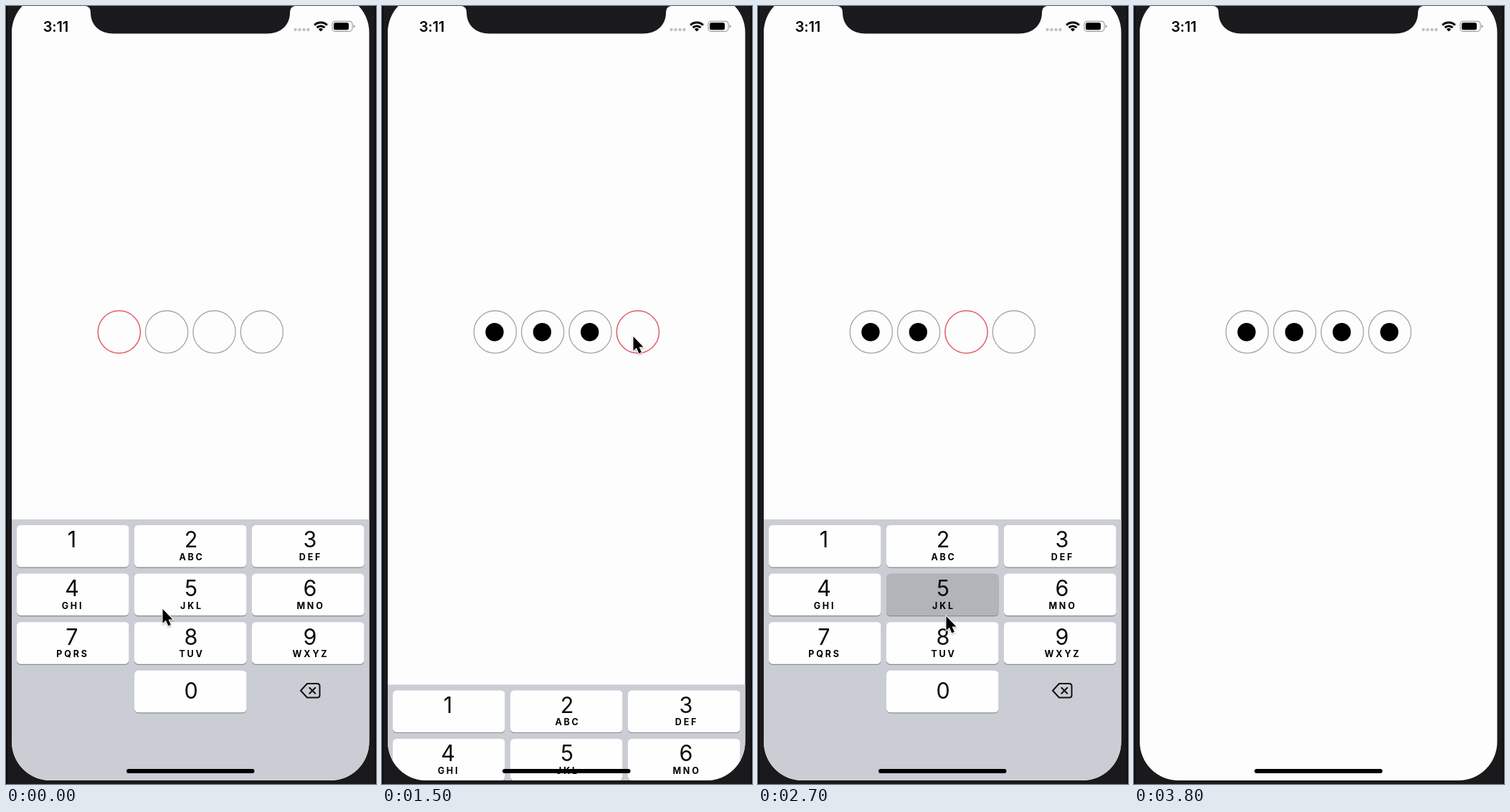
Recreate the animation shown at these times as an HTML page. Size 516 by 1085 pixels, loop 4100 ms.

```html
<!DOCTYPE html>
<html lang="en">
<head>
<meta charset="utf-8">
<title>Passcode entry</title>
<style>
  html, body { margin: 0; width: 100%; height: 100%; overflow: hidden; background: #1a191b; }
  svg { display: block; width: 516px; height: 1085px; font-family: Inter, "Noto Sans", sans-serif; }
  .digit { font-size: 30.5px; text-anchor: middle; fill: #0b0b0c; }
  .letters { font-size: 12.5px; font-weight: 700; letter-spacing: 2.8px; text-anchor: middle; }
  .field { fill: none; stroke: #a4a4a8; stroke-width: 1.3; }
  .field.active { stroke: #e05c6b; stroke-width: 1.5; }
  .key { fill: #fefefe; }
  .key.pressed { fill: #b2b4b9; }
</style>
</head>
<body>
<svg viewBox="0 0 516 1085">
  <defs>
    <clipPath id="screen"><rect x="8" y="-17" width="498.5" height="1097" rx="54"/></clipPath>
    <filter id="shadow" x="-50%" y="-50%" width="200%" height="200%">
      <feDropShadow dx="0" dy="1.5" stdDeviation="1.3" flood-opacity=".35"/>
    </filter>
  </defs>
  <rect width="516" height="1085" fill="#1a191b"/>
  <path d="M1 0V1085M515 0V1085" stroke="#0d0c0d" stroke-width="2"/>
  <g clip-path="url(#screen)">
    <rect width="516" height="1085" fill="#fefdfe"/>
    <g id="fields"></g>
    <g id="keyboard">
      <rect x="8" y="716" width="499" height="370" fill="#cacdd4"/>
      <g id="keys"></g>
      <g fill="none" stroke="#111" stroke-width="2" stroke-linejoin="round" stroke-linecap="round">
        <path d="M420 945H434Q437.5 945 437.5 948.5V961Q437.5 964.5 434 964.5H420L411 954.700Z"/>
        <path d="M423.3 950.7L431.3 958.7M431.3 950.7L423.3 958.7"/>
      </g>
    </g>
    <rect x="168" y="1064" width="178.5" height="6" rx="3"/>
  </g>
  <path d="M111 0Q118 1 118 9C118 27 131 38.5 150 38.5H364C383 38.5 396 27 396 9Q396 1 403 0Z" fill="#1a191b"/>
  <text x="51.7" y="36" font-size="20" font-weight="600" letter-spacing="-.2">3:11</text>
  <path d="M403.5 33H422" stroke="#c3c3c6" stroke-width="4.5" stroke-linecap="round" stroke-dasharray="0 6"/>
  <g fill="none" stroke="#000" stroke-width="3">
    <path d="M430.2 26.7A12.5 12.5 0 0 1 447.8 26.7M433.6 30.1A7.7 7.7 0 0 1 444.4 30.1"/>
    <path d="M439 35.5L435.9 32.4A4.4 4.4 0 0 1 442.1 32.4Z" fill="#000" stroke="none"/>
  </g>
  <rect x="455" y="21.3" width="28" height="14" rx="4" fill="none" stroke="#9c9c9f" stroke-width="1.2"/>
  <rect x="457" y="23.3" width="21" height="10" rx="2.3"/>
  <path d="M484.6 25.8Q486.5 26.5 486.5 28.3T484.6 30.8Z" fill="#9c9c9f"/>
  <g id="cursor">
    <path transform="translate(.5 1) scale(.9)" d="M0 0V22L5 17.6L8.7 26L12.6 24.3L9 16H15.5Z" stroke="#fff" stroke-width="2" paint-order="stroke" filter="url(#shadow)"/>
  </g>
</svg>
<script>
const LOOP = 4100, STEP = 100, LAST = 3800, KEYBOARD_HEIGHT = 366;
const PRESS_TIME = 150, FILL_DELAY = 60, FOCUS_DELAY = 130, TRAVEL = 270;
const $ = id => document.getElementById(id);

function add(parent, tag, attributes, text = "") {
  const node = document.createElementNS("http://www.w3.org/2000/svg", tag);
  for (const name in attributes) node.setAttribute(name, attributes[name]);
  node.textContent = text;
  parent.append(node);
  return node;
}

const fields = [0, 1, 2, 3].map(i => {
  const x = 157.8 + i * 66.35;
  return {
    ring: add($("fields"), "circle", { cx: x, cy: 454.6, r: 29.6, class: "field" }),
    dot: add($("fields"), "circle", { cx: x - 0.8, cy: 454.8, r: 12.7 })
  };
});

const keys = {};
const letters = ["", "ABC", "DEF", "GHI", "JKL", "MNO", "PQRS", "TUV", "WXYZ"];
function addKey(digit, column, row) {
  const x = 15 + column * 164, y = 724 + row * 67.6;
  const center = 92 + column * 166;
  const box = { x, width: 156.5, height: 58.5, rx: 5.5 };
  add($("keys"), "rect", { ...box, y: y + 1.2, fill: "#898b90" });
  keys[digit] = add($("keys"), "rect", { ...box, y, class: "key" });
  add($("keys"), "text", { x: center, y: y + (digit ? 31.3 : 39), class: "digit" }, digit);
  if (digit) add($("keys"), "text", { x: center + 1, y: y + 49, class: "letters" }, letters[digit - 1]);
}
for (let i = 0; i < 9; i++) addKey(i + 1, i % 3, Math.floor(i / 3));
addKey(0, 1, 3);

// What the user does, and where the cursor is at that moment
const actions = [
  { at: 70, type: "key", key: 5, x: 218, y: 840 },
  { at: 370, type: "key", key: 6, x: 385, y: 838 },
  { at: 670, type: "key", key: 3, x: 385, y: 770 },
  { at: 1170, type: "dismiss", x: 368, y: 553 },
  { at: 1462, type: "focus", x: 350, y: 460 },
  { at: 1860, type: "delete", x: 404, y: 930 },
  { at: 1960, type: "delete", x: 404, y: 930 },
  { at: 2130, type: "key", key: 5, x: 262, y: 850 },
  { at: 2650, type: "key", key: 5, x: 262, y: 850 },
  { at: 3060, type: "key", key: 6, x: 370, y: 794 },
  { at: 3470, type: "dismiss", x: 370, y: 794 },
  { at: 3700, type: "leave", x: 385, y: 573 }
];

const count = (type, t) => actions.filter(a => a.type === type && a.at <= t).length;

// Critically damped spring from 0 to 1
function spring(t) {
  const u = Math.max(0, t) * 0.034;
  return 1 - (1 + u) * Math.exp(-u);
}

function slide(type, t) {
  return actions.filter(a => a.type === type).reduce((sum, a) => sum + spring(t - a.at), 0);
}

// The cursor rests, then eases into place just before the next action
function cursorAt(t) {
  const next = actions.find(a => a.at > t) ?? actions.at(-1);
  const from = actions.findLast(a => a.at <= t) ?? next;
  const duration = Math.min(TRAVEL, next.at - from.at) || 1;
  const p = Math.min(1, Math.max(0, 1 - (next.at - t) / duration));
  const eased = 1 - (1 - p) ** 3;
  return [from.x + (next.x - from.x) * eased, from.y + (next.y - from.y) * eased];
}

function draw(t) {
  const deleted = count("delete", t);
  const filled = count("key", t - FILL_DELAY) - deleted;
  const focus = count("key", t - FOCUS_DELAY) - deleted;
  const editing = count("dismiss", t) <= count("focus", t);
  const pressed = actions.find(a => a.key && t >= a.at && t < a.at + PRESS_TIME)?.key;

  fields.forEach(({ ring, dot }, i) => {
    ring.classList.toggle("active", editing && i === focus);
    dot.style.display = i < filled ? "" : "none";
  });
  for (const digit in keys) keys[digit].classList.toggle("pressed", +digit === pressed);

  const hidden = slide("dismiss", t) - slide("focus", t);
  $("keyboard").setAttribute("transform", `translate(0 ${hidden * KEYBOARD_HEIGHT})`);
  $("cursor").setAttribute("transform", `translate(${cursorAt(t)})`);
  $("cursor").style.display = count("leave", t) ? "none" : "";
}

function tick() {
  const t = (performance.now() + 1) % LOOP;
  draw(Math.min(LAST, Math.floor(t / STEP) * STEP));
  requestAnimationFrame(tick);
}
tick();
</script>
</body>
</html>
```
